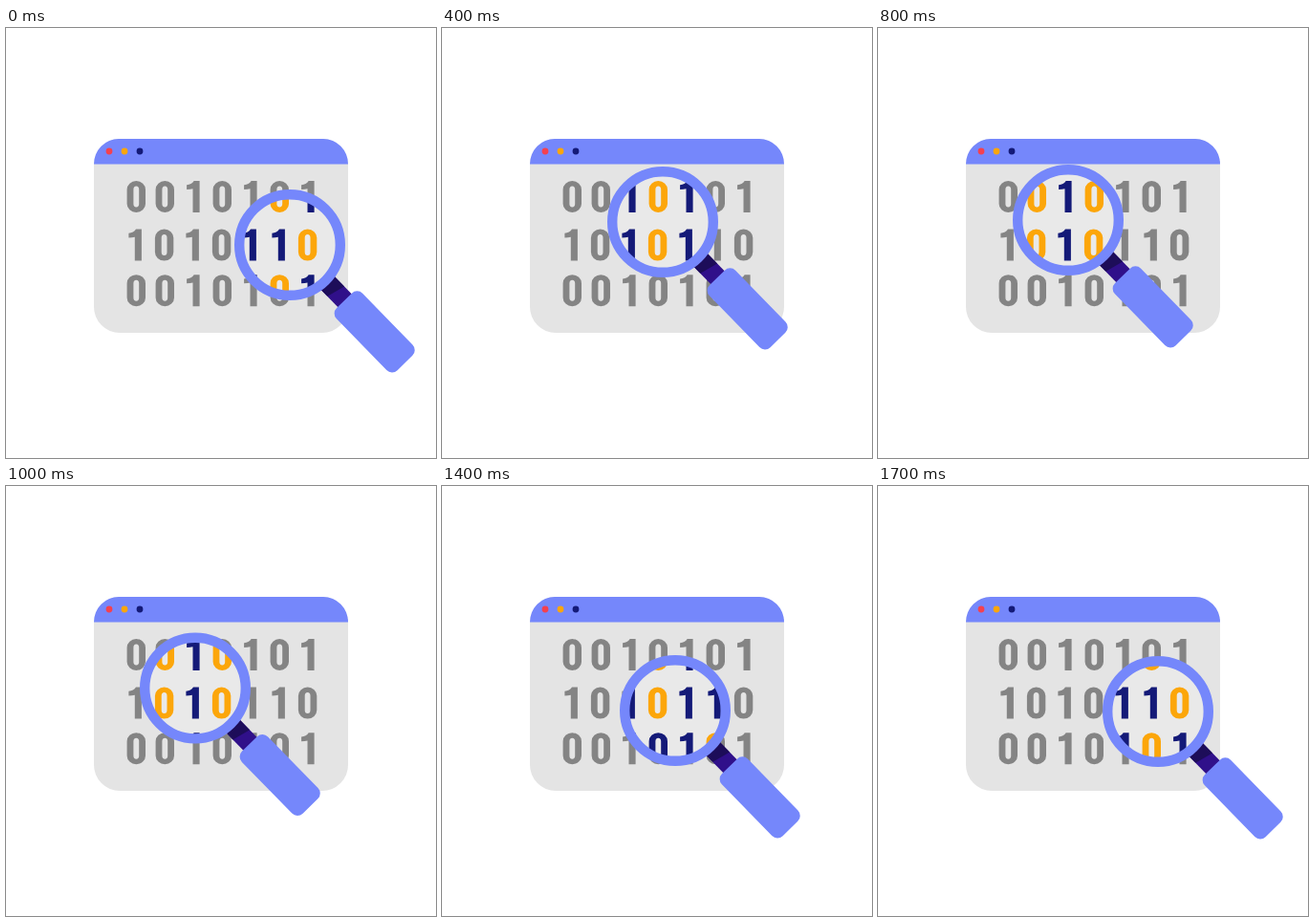
Animation, 450 px wide and 450 px high, one loop 1800 ms. Source, as an HTML page:

```html
<!DOCTYPE html>
<html lang="en">
<head>
<meta charset="utf-8">
<title>Binary search</title>
<style>
  @property --x { syntax: "<length>"; inherits: true; initial-value: 297px; }
  @property --y { syntax: "<length>"; inherits: true; initial-value: 227px; }

  html, body { margin: 0; width: 100%; height: 100%; overflow: hidden; background: #fff; }
  .stage {
    position: relative; width: 450px; height: 450px; overflow: hidden;
    animation: sweep 1800ms step-end infinite;
  }
  svg { position: absolute; left: 0; top: 0; width: 450px; height: 450px; }
  .lens { clip-path: circle(54px at var(--x) var(--y)); }
  .glass { transform: translate(var(--x), var(--y)); }

  .blue { fill: #7587fb; }
  .gray { fill: #848484; }
  .navy { fill: #141a78; }
  .gold { fill: #fca60a; }
  .red { fill: #f4414f; }

  @keyframes sweep {
    0%      { --x: 297px; --y: 227px; }
    5.555%  { --x: 282px; --y: 218px; }
    11.111% { --x: 265px; --y: 211px; }
    16.666% { --x: 248px; --y: 206px; }
    22.222% { --x: 231px; --y: 203px; }
    27.777% { --x: 219px; --y: 200px; }
    33.333% { --x: 211px; --y: 198px; }
    38.888% { --x: 204px; --y: 199px; }
    44.444% { --x: 199px; --y: 201px; }
    50%     { --x: 197px; --y: 205px; }
    55.555% { --x: 198px; --y: 211.6px; }
    61.111% { --x: 207px; --y: 221px; }
    66.666% { --x: 218px; --y: 229px; }
    72.222% { --x: 230px; --y: 233px; }
    77.777% { --x: 244px; --y: 235px; }
    83.333% { --x: 261px; --y: 237px; }
    88.888% { --x: 278px; --y: 238px; }
    94.444% { --x: 293px; --y: 236px; }
  }
</style>
</head>
<body>
<div class="stage">
  <svg viewBox="0 0 450 450">
    <defs>
      <path id="d0" fill-rule="evenodd" d="M-9.700 9a9.700 9 0 0 1 19.400 0v15a9.700 9 0 0 1-19.400 0z
        M-2.900 9v15a2.900 3.500 0 0 0 5.800 0v-15a2.900 3.500 0 0 0-5.800 0z"/>
      <path id="d1" d="M.4 0H6.300V33H-.8V8.200Q-3.500 9-7.200 9V4.200Q-2 3.800 .4 0z"/>
    </defs>
    <rect x="92" y="116" width="266" height="203" rx="27" fill="#e4e4e4"/>
    <path class="blue" d="M92 142.400a26 26.400 0 0 1 26-26.400h214a26 26.400 0 0 1 26 26.400z"/>
    <circle class="red" cx="108" cy="129" r="3.400"/>
    <circle class="gold" cx="124" cy="129" r="3.400"/>
    <circle class="navy" cx="140" cy="129" r="3.400"/>
    <g id="plain"></g>
  </svg>

  <svg class="lens" viewBox="0 0 450 450">
    <rect width="450" height="450" fill="#e9e9e9"/>
    <g id="vivid"></g>
  </svg>

  <svg viewBox="0 0 450 450">
    <g class="glass">
      <g transform="rotate(45.700)">
        <rect x="55" y="-10.400" width="30" height="19.800" fill="#30108a"/>
        <path d="M55-10.400H71L66 9.400H55z" fill="#1d0d59"/>
        <rect class="blue" x="81.500" y="-19" width="91" height="38" rx="8"/>
      </g>
      <circle r="52.800" fill="none" stroke="#7587fb" stroke-width="10.400"/>
    </g>
  </svg>
</div>

<script>
  const rows = ["0010101", "1010110", "0010101"];
  const lefts = [136.3, 135.6, 136.3];
  const tops = [160, 210.6, 258.2];

  function drawDigits(id, colour) {
    const marks = rows.flatMap((row, r) => [...row].map((digit, c) =>
      `<use href="#d${digit}" x="${lefts[r] + c * 30}" y="${tops[r]}" class="${colour(digit, r, c)}"/>`));
    document.getElementById(id).innerHTML = marks.join("");
  }

  drawDigits("plain", () => "gray");
  // The middle zero of the last row is navy like the ones.
  drawDigits("vivid", (digit, r, c) => digit === "1" || (r === 2 && c === 3) ? "navy" : "gold");
</script>
</body>
</html>
```
